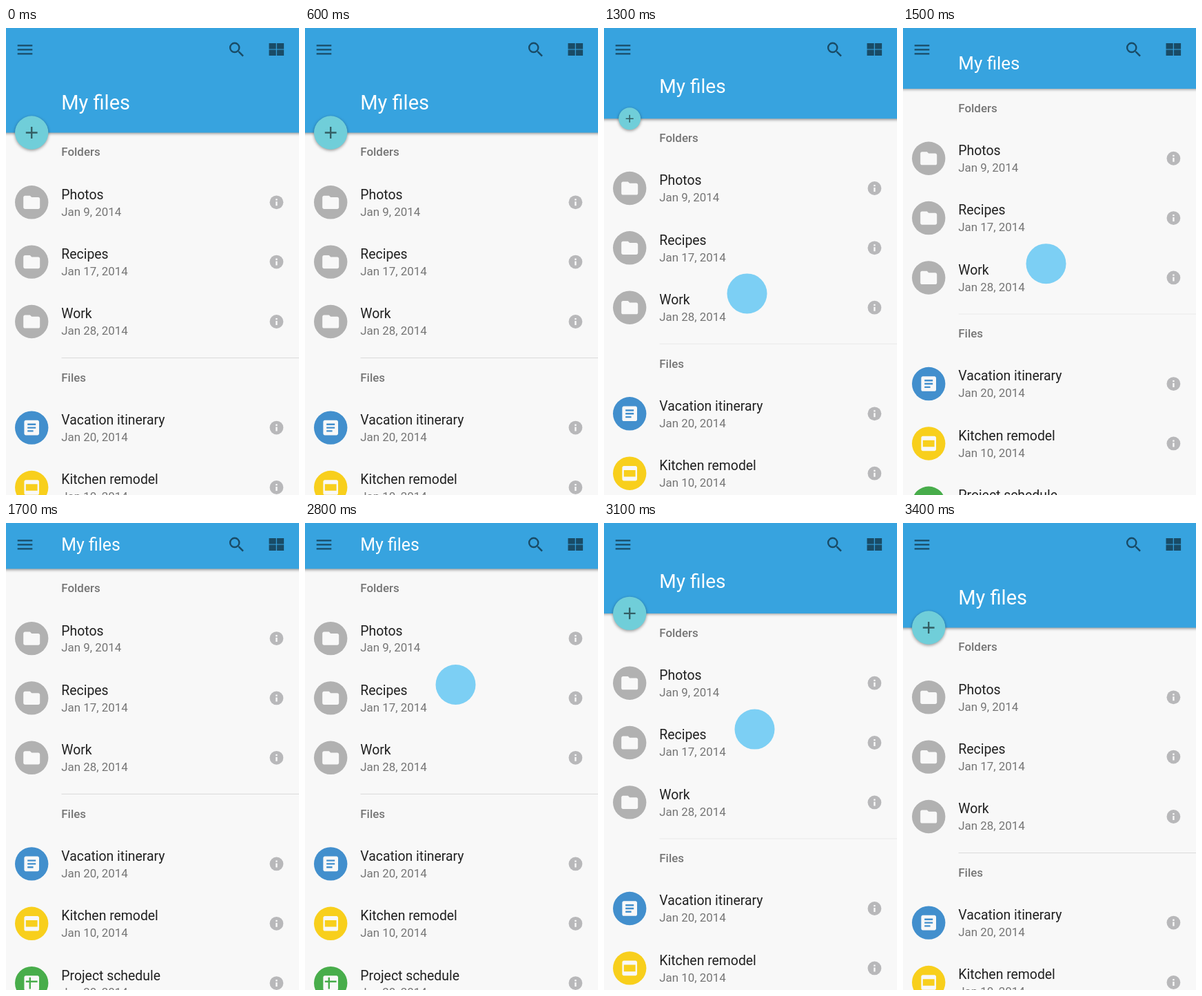
Animation of 425x676 px, one loop 7700 ms. Source, as an HTML page with a canvas:

```html
<!DOCTYPE html>
<html lang="en">
<head>
<meta charset="utf-8">
<title>My files</title>
<style>
html, body { margin: 0; height: 100%; overflow: hidden; background: #f8f8f8; }
canvas { display: block; }
</style>
</head>
<body>
<canvas id="stage" width="425" height="676"></canvas>
<script>
const ctx = document.getElementById('stage').getContext('2d');
const LOOP = 7700, STEP = 100, RANGE = 85.2;
const DARK = 'rgba(0,0,0,.54)', GREY = '#757575', PAPER = '#f8f8f8';

// Icons on a 24-unit grid
const sheet = 'M19 3H5C3.9 3 3 3.9 3 5V19C3 20.1 3.9 21 5 21H19C20.1 21 21 20.1 21 19V5C21 3.9 20.1 3 19 3Z';
const icons = {
  menu: 'M3 18h18v-2H3zM3 13h18v-2H3zM3 6v2h18V6z',
  search: 'M15.5 14h-.79l-.28-.27A6.47 6.47 0 0 0 16 9.5 6.5 6.5 0 1 0 9.5 16c1.61 0 3.09-.59 4.23-1.57l.27.28v.79l5 4.99L20.49 19zM9.5 14a4.5 4.5 0 1 1 0-9 4.5 4.5 0 0 1 0 9z',
  grid: 'M3 4.5h8.5v7H3zM12.5 4.5H21v7h-8.5zM3 12.5h8.5v7H3zM12.5 12.5H21v7h-8.5z',
  plus: 'M19 13h-6v6h-2v-6H5v-2h6V5h2v6h6z',
  folder: 'M10 4H4C2.9 4 2 4.9 2 6V18C2 19.1 2.9 20 4 20H20C21.1 20 22 19.1 22 18V8C22 6.9 21.1 6 20 6H12z',
  doc: sheet + 'M7 7h10v2H7zM7 11h10v2H7zM7 15h7v2H7z',
  slides: sheet + 'M5 8h14v8H5z',
  table: sheet + 'M19 11h-8v8H9v-8H5V9h4V5h2v4h8z',
  info: 'M10.8 11h2.4v6h-2.4zM10.8 7h2.4v2.3h-2.4z'
};
for (const k in icons) icons[k] = new Path2D(icons[k]);

const rows = [
  [252.3, 'Photos', 'Jan 9, 2014', 'folder', '#b1b1b1'],
  [338.6, 'Recipes', 'Jan 17, 2014', 'folder', '#b1b1b1'],
  [425, 'Work', 'Jan 28, 2014', 'folder', '#b1b1b1'],
  [578.6, 'Vacation itinerary', 'Jan 20, 2014', 'doc', '#428fcd'],
  [665, 'Kitchen remodel', 'Jan 10, 2014', 'slides', '#f8cf1c'],
  [751.3, 'Project schedule', 'Jan 20, 2014', 'table', '#48ad4b']
];

// Keys are [time, value] pairs
const scrollKeys = [[1200, 0], [1300, 20.3], [1600, RANGE], [2800, RANGE], [3000, 41.2], [3200, 0]];
const fabKeys = [[1200, 1], [1300, .66], [1500, 0], [2800, 0], [3000, .81], [3100, 1]];
const touches = [
  { x: 207.5, y: 404.7, keys: [[1199, 0], [1200, 1], [1500, 1], [1700, 0]] },
  { x: 218.5, y: 319.2, keys: [[2799, 0], [2800, 1], [3200, 1], [3400, 0]] }
];

function at(keys, t) {
  if (t <= keys[0][0]) return keys[0][1];
  for (let i = 1; i < keys.length; i++) {
    const [t0, a] = keys[i - 1], [t1, b] = keys[i];
    if (t <= t1) return a + (b - a) * (t - t0) / (t1 - t0);
  }
  return keys[keys.length - 1][1];
}

function disc(x, y, r, color) {
  ctx.fillStyle = color;
  ctx.beginPath();
  ctx.arc(x, y, r, 0, 2 * Math.PI);
  ctx.fill();
}

function icon(name, x, y, color, scale = 1.2) {
  ctx.save();
  ctx.translate(x, y);
  ctx.scale(scale, scale);
  ctx.translate(-12, -12);
  ctx.fillStyle = color;
  ctx.fill(icons[name], 'evenodd');
  ctx.restore();
}

function text(str, y, size, color, weight = 400) {
  ctx.font = `${weight} ${size}px Roboto, sans-serif`;
  ctx.fillStyle = color;
  ctx.fillText(str, 80.3, y);
}

function shadow(color, blur, dy) {
  ctx.shadowColor = color;
  ctx.shadowBlur = blur;
  ctx.shadowOffsetY = dy;
}

function drawList(scroll) {
  ctx.save();
  ctx.translate(0, -scroll);
  text('Folders', 185.4, 16.9, GREY, 500);
  text('Files', 511.8, 16.9, GREY, 500);
  ctx.fillStyle = scroll > 0 && scroll < RANGE ? '#ebebeb' : '#dcdcdc';
  ctx.fillRect(80.5, 477, 344.5, 1.1);
  for (const [y, name, date, kind, color] of rows) {
    disc(37.2, y, 24.2, color);
    icon(kind, 37.2, y, PAPER);
    text(name, y - 4.6, 19.4, '#212121');
    text(date, y + 19.2, 16.9, GREY);
    disc(392.4, y, 9.9, '#b8b8ba');
    icon('info', 392.4, y, PAPER, 1);
  }
  ctx.restore();
}

function drawHeader(scroll, fab) {
  const p = scroll / RANGE, edge = 151.5 - scroll;
  ctx.save();
  shadow('rgba(0,0,0,.4)', 4, 1.5);
  ctx.fillStyle = '#37a3df';
  ctx.fillRect(-10, -10, 445, edge + 10);
  ctx.restore();

  const size = 29 - 4.1 * p;
  const mid = 107.8 - 76.8 * p - 5 * Math.max(0, Math.sin(2 * Math.PI * p));
  text('My files', mid + size * .355, size, '#fff');
  icon('menu', 27.5, 31.4, DARK);
  icon('search', 334.7, 31.4, DARK);
  icon('grid', 392.3, 31, DARK);

  if (fab > 0) {
    ctx.save();
    shadow('rgba(0,0,0,.4)', 4, 1.5);
    disc(37.2, edge, 24.2 * fab, '#70ced9');
    ctx.restore();
    icon('plus', 37.2, edge, DARK, 1.2 * fab);
  }
}

function draw(t) {
  const scroll = at(scrollKeys, t);
  ctx.fillStyle = PAPER;
  ctx.fillRect(0, 0, 425, 676);
  drawList(scroll);
  drawHeader(scroll, at(fabKeys, t));
  for (const { x, y, keys } of touches) {
    ctx.globalAlpha = at(keys, t);
    if (ctx.globalAlpha > 0) disc(x, y - scroll, 29 + 4 * (1 - ctx.globalAlpha), '#7ccff4');
  }
  ctx.globalAlpha = 1;
}

const start = performance.now();
function tick() {
  const t = (performance.now() - start) % LOOP;
  draw(Math.floor(t / STEP) * STEP);
  requestAnimationFrame(tick);
}
tick();
</script>
</body>
</html>
```
